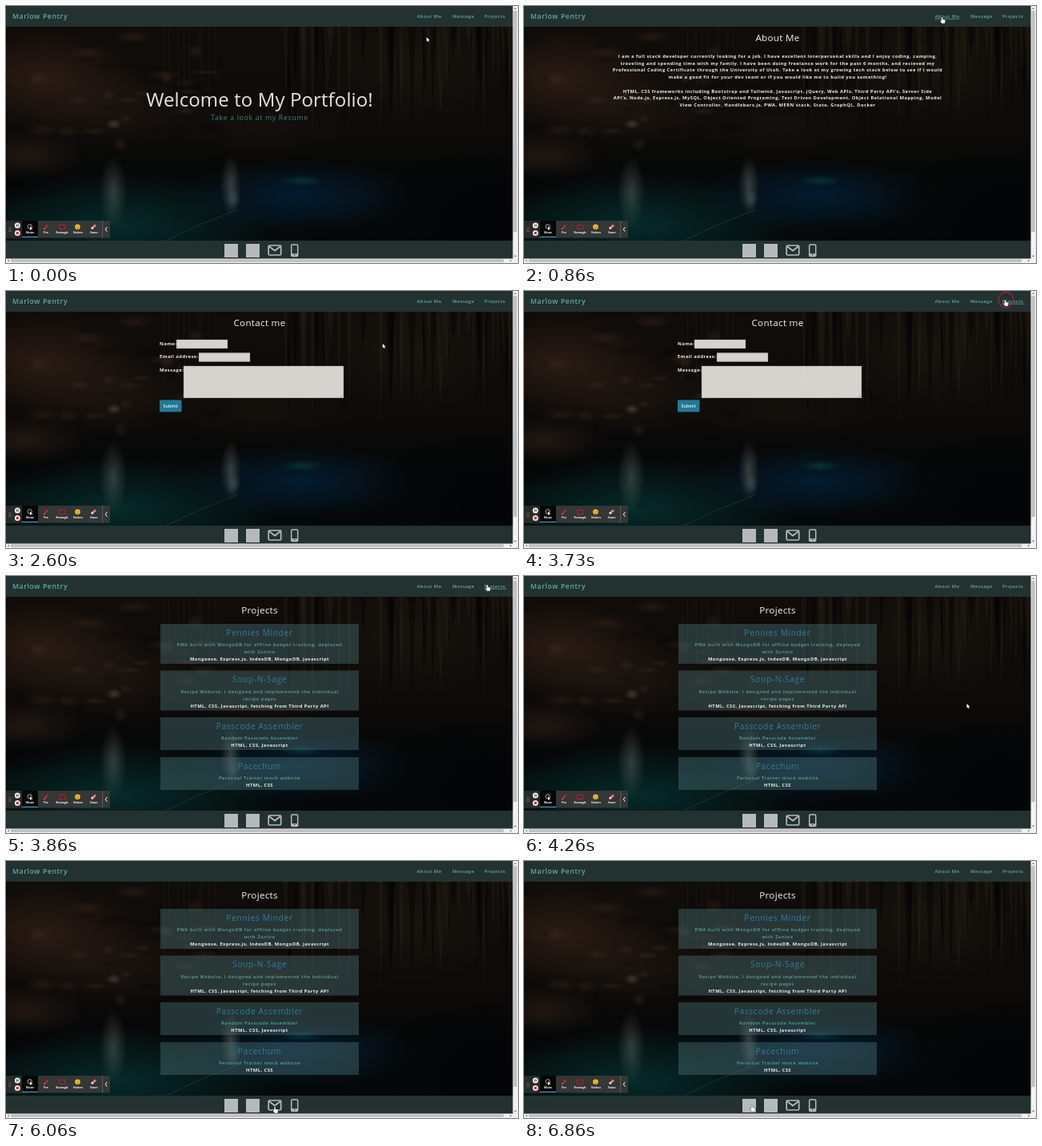
Write an HTML page with a canvas that moves like this. It is 640 by 322 pixels and loops after 7 s.

```html
<!DOCTYPE html>
<html lang="en">
<head>
<meta charset="utf-8">
<title>Portfolio walkthrough</title>
<style>
  html, body { margin: 0; width: 100%; height: 100%; overflow: hidden; background: #0b0d0d; }
  canvas { display: block; }
</style>
</head>
<body>
<canvas id="stage" width="640" height="322"></canvas>
<script>
const LOOP = 7000, CENTER = 317;
const stage = document.getElementById('stage');
let ctx = stage.getContext('2d');

// Screen updates come in bursts: [start, end, count]
const updates = [
  [0, 0, 1], [130, 660, 8], [860, 1260, 7], [1400, 1460, 2], [1600, 1800, 3],
  [2000, 2060, 2], [2200, 2860, 11], [3000, 3000, 1], [3730, 4260, 7], [4530, 4530, 1],
  [4930, 5000, 2], [5200, 5330, 2], [5530, 5600, 2], [6060, 6060, 1], [6260, 6460, 4],
  [6600, 6600, 1], [6860, 6860, 1]
].flatMap(([start, end, count]) =>
  Array.from({ length: count }, (_, i) => start + (end - start) * i / (count - 1 || 1)));

// Pointer hot spot: [time, x, y]
const route = [
  [0, 525.7, 39], [130, 526, 38], [660, 522.5, 14], [860, 522.5, 14], [1260, 484, 72],
  [1460, 492, 62], [1800, 548, 27], [2060, 562.5, 14], [2200, 562.5, 14], [2530, 440, 78],
  [2860, 594, 18], [3000, 601.5, 11], [3820, 601.5, 11], [4260, 553.5, 160],
  [4530, 520, 200], [5000, 440, 268], [5330, 376, 300], [5600, 361, 307],
  [6060, 336, 308], [6460, 312, 307], [6600, 309, 306], [6860, 285, 306], [LOOP, 285, 306]
];
const clicks = [660, 2060, 3730];

const styles = {
  brand:   { font: '600 8.7px', spacing: .6, color: '#62aaa6' },
  nav:     { font: '600 5.83px', spacing: .46, color: '#62aaa6' },
  hero:    { font: '500 24px', spacing: .1, color: '#e6e4e0' },
  resume:  { font: '400 8.74px', spacing: .68, color: '#3a7f8d' },
  heading: { font: '500 11.65px', spacing: .3, color: '#f4f4f2' },
  body:    { font: '700 5.83px', spacing: .45, color: '#eeeeec' },
  project: { font: '400 10.2px', spacing: .64, color: '#2f7d9b' },
  summary: { font: '600 5.83px', spacing: .55, color: '#5ba39f' },
  button:  { font: '600 5.2px', spacing: .1, color: '#f4f8fa' },
  tool:    { font: '700 3.1px', spacing: 0, color: '#ffffff' }
};

const links = [['About Me', 513.5, 31], ['Message', 558, 27], ['Projects', 598, 28]];
const icons = [273, 300, 327, 353];

const about = [
  'I am a full stack developer currently looking for a job. I have excellent interpersonal skills and I enjoy coding, camping,',
  'traveling and spending time with my family. I have been doing freelance work for the past 6 months, and recieved my',
  'Professional Coding Certificate through the University of Utah. Take a look at my growing tech stack below to see if I would',
  'make a good fit for your dev team or if you would like me to build you something!',
  '',
  "HTML, CSS frameworks including Bootstrap and Tailwind, Javascript, jQuery, Web APIs, Third Party API's, Server Side",
  "API's, Node.js, Express.js, MySQL, Object Oriented Programing, Test Driven Development, Object Relational Mapping, Model",
  'View Controller, Handlebars.js, PWA, MERN stack, State, GraphQL, Docker'
];

const projects = [
  [60, 50, 'Pennies Minder', ['PWA built with MongoDB for offline budget tracking, deployed', 'with Zunivo'],
    'Mongoose, Express.js, IndexDB, MongoDB, javascript'],
  [118.5, 50, 'Soup-N-Sage', ['Recipe Website, I designed and implemented the individual', 'recipe pages'],
    'HTML, CSS, Javascript, fetching from Third Party API'],
  [177, 41, 'Passcode Assembler', ['Random Passcode Assembler'], 'HTML, CSS, Javascript'],
  [227, 41, 'Pacechum', ['Personal Trainer mock website'], 'HTML, CSS']
];

function box(x, y, w, h, fill, radius = 0) {
  ctx.fillStyle = fill;
  ctx.beginPath();
  ctx.roundRect(x, y, w, h, radius);
  ctx.fill();
}

function frame(x, y, w, h, color, width = 1, radius = 0) {
  ctx.strokeStyle = color;
  ctx.lineWidth = width;
  ctx.beginPath();
  ctx.roundRect(x, y, w, h, radius);
  ctx.stroke();
}

function disc(x, y, r, fill) {
  ctx.fillStyle = fill;
  ctx.beginPath();
  ctx.arc(x, y, r, 0, 2 * Math.PI);
  ctx.fill();
}

function ring(x, y, r, color, width) {
  ctx.strokeStyle = color;
  ctx.lineWidth = width;
  ctx.beginPath();
  ctx.arc(x, y, r, 0, 2 * Math.PI);
  ctx.stroke();
}

function line(points, color, width = 1) {
  ctx.strokeStyle = color;
  ctx.lineWidth = width;
  ctx.beginPath();
  points.forEach(([x, y]) => ctx.lineTo(x, y));
  ctx.stroke();
}

function text(string, x, y, name, align = 'left') {
  const { font, spacing, color } = styles[name];
  ctx.font = `${font} "Open Sans", "Noto Sans", sans-serif`;
  ctx.letterSpacing = `${spacing}px`;
  ctx.fillStyle = color;
  ctx.textAlign = align;
  ctx.fillText(string, x, y);
}

const centered = (string, y, name) => text(string, CENTER, y, name, 'center');

function glow(x, y, rx, ry, rgb, alpha) {
  ctx.save();
  ctx.translate(x, y);
  ctx.scale(rx, ry);
  const shade = ctx.createRadialGradient(0, 0, 0, 0, 0, 1);
  shade.addColorStop(0, `rgba(${rgb},${alpha})`);
  shade.addColorStop(.5, `rgba(${rgb},${alpha * .5})`);
  shade.addColorStop(1, `rgba(${rgb},0)`);
  ctx.fillStyle = shade;
  ctx.fillRect(-1, -1, 2, 2);
  ctx.restore();
}

function paintCave() {
  let seed = 11;
  const random = () => (seed = seed * 16807 % 2147483647) / 2147483647;
  const base = ctx.createLinearGradient(0, 26, 0, 294);
  [[0, '#100c09'], [.5, '#0d0a08'], [.65, '#070808'], [1, '#050a0c']]
    .forEach(([stop, color]) => base.addColorStop(stop, color));
  box(0, 26, 634, 268, base);

  // rock walls and hanging formations
  glow(45, 90, 130, 60, '66,42,28', .55);
  glow(130, 130, 130, 50, '48,34,24', .4);
  glow(25, 188, 75, 30, '58,38,26', .5);
  glow(510, 75, 110, 80, '40,33,22', .4);
  glow(320, 150, 120, 45, '30,23,16', .4);
  for (let i = 0; i < 40; i++) {
    glow(random() * 260, 35 + random() * 150, 8 + random() * 18, 3 + random() * 7,
      i % 2 ? '80,54,38' : '2,2,2', .3);
  }
  for (let i = 0; i < 50; i++) {
    const x = 350 + random() * 280, width = 1 + random() * 4, tip = 55 + random() * 115;
    ctx.fillStyle = i % 2 ? 'rgba(60,50,32,.22)' : 'rgba(2,2,2,.4)';
    ctx.fill(new Path2D(`M${x - width} 26H${x + width}L${x + width / 2} ${tip * .7}L${x} ${tip}Z`));
  }
  for (let i = 0; i < 9; i++) {
    const x = 195 + i * 8 + random() * 6;
    line([[x, 26], [x + 1, 60 + random() * 70]], 'rgba(130,108,85,.16)', .6);
  }

  // pool and reflections
  glow(140, 275, 200, 65, '6,62,60', .62);
  glow(365, 238, 150, 46, '2,34,60', .75);
  glow(370, 219, 28, 7, '10,85,82', .45);
  glow(0, 225, 90, 25, '3,4,4', .6);
  glow(600, 265, 160, 90, '2,3,4', .9);
  glow(430, 295, 150, 34, '3,6,8', .7);
  glow(135, 148, 10, 7, '150,145,130', .3);
  glow(134, 233, 17, 46, '120,135,128', .36);
  glow(281, 225, 13, 38, '140,145,132', .36);
  glow(284, 242, 9, 14, '160,170,160', .2);
  line([[200, 294], [240, 275], [290, 255]], 'rgba(90,118,100,.35)', .8);
}

const cave = document.createElement('canvas');
cave.width = 640;
cave.height = 322;
ctx = cave.getContext('2d');
paintCave();
ctx = stage.getContext('2d');

const pages = {
  home() {
    centered('Welcome to My Portfolio!', 126, 'hero');
    centered('Take a look at my Resume', 142.5, 'resume');
  },
  about() {
    centered('About Me', 44, 'heading');
    about.forEach((row, i) => centered(row, 64.8 + i * 8.78, 'body'));
  },
  contact() {
    centered('Contact me', 44, 'heading');
    [['Name:', 67.5, 213, 61, 64, 11], ['Email address:', 84, 241, 77.5, 64, 11],
     ['Message:', 100.8, 222, 94, 200, 40]].forEach(([label, baseline, x, y, w, h]) => {
      text(label, 192, baseline, 'body');
      box(x, y, w, h, 'rgba(235,233,228,.9)');
      frame(x + .25, y + .25, w - .5, h - .5, '#a5a5a2', .5);
    });
    line([[418.5, 133], [421, 130.5]], '#777', .5);
    box(192, 136.5, 27.5, 15, '#23799a', 1.5);
    text('Submit', 205.8, 145.8, 'button', 'center');
  },
  projects() {
    centered('Projects', 46.5, 'heading');
    projects.forEach(([y, h, title, summary, tech]) => {
      box(193, y, 248, h, 'rgba(78,116,120,.42)');
      centered(title, y + 14.6, 'project');
      summary.forEach((row, i) => centered(row, y + 28.4 + i * 8.8, 'summary'));
      centered(tech, y + 28.4 + summary.length * 8.8, 'body');
    });
  }
};

function pageAt(time) {
  if (time < 860) return 'home';
  if (time < 2200) return 'about';
  return time <= 3730 ? 'contact' : 'projects';
}

function drawChrome(hovered) {
  box(0, 0, 634, 26, '#233130');
  box(0, 294, 634, 23, '#233130');
  text('Marlow Pentry', 8, 16, 'brand');
  links.forEach(link => {
    const [label, x, width] = link;
    text(label, x, 15, 'nav');
    if (link === hovered) box(x, 15.8, width, .7, styles.nav.color);
  });

  const silver = '#b4babb';
  box(icons[0], 298, 17, 17, silver);
  box(icons[1], 298, 17, 17, silver);
  frame(328.2, 300, 15.5, 12, silver, 1.7, 1.2);
  line([[328.7, 301], [336, 306.5], [343.2, 301]], silver, 1.8);
  frame(356.7, 299, 8, 14.5, silver, 1.5, 1.2);
  box(356.7, 310.2, 8, 3, silver);
  disc(360.7, 311.8, .8, '#233130');

  // scrollbars
  box(633.5, 0, 6.5, 322, '#f1f1f1');
  box(0, 316.4, 640, 5.6, '#f1f1f1');
  box(634.3, 6, 4.4, 277, '#c1c1c1');
  box(6, 317.2, 616, 3.8, '#c1c1c1');
  ctx.fillStyle = '#555';
  [[636.6, 3, 0], [636.6, 313.5, 2], [3, 319.2, 3], [631, 319.2, 1]].forEach(([x, y, turns]) => {
    ctx.save();
    ctx.translate(x, y);
    ctx.rotate(turns * Math.PI / 2);
    ctx.fill(new Path2D('M0 -1 1.4 .7H-1.4Z'));
    ctx.restore();
  });
}

function drawToolbar() {
  box(0, 269, 130, 21.5, '#353636');
  box(0, 269, 20, 21.5, '#292a2a');
  box(20, 269, 20, 21.5, '#060707');
  box(20, 288.8, 20, 1.2, '#4b93c8');
  box(120.5, 269, .6, 21.5, '#777');
  for (let i = 0; i < 6; i++) disc(4 + i % 2 * 2, 278 + (i >> 1) * 2.3, .5, '#aaa');

  disc(14.3, 275, 3.5, '#f3f3f3');
  box(13, 273.6, .9, 2.8, '#333');
  box(14.8, 273.6, .9, 2.8, '#333');
  disc(14.3, 284.5, 3.5, '#e9e5e5');
  box(12.8, 283, 3, 3, '#d4213b', .5);

  ring(29.7, 276.3, 2.7, '#d8c9cb', .8);
  ctx.fillStyle = '#fff';
  ctx.fill(new Path2D('M30 276V281L31.2 279.8 33.3 279.5Z'));
  line([[48, 279.2], [52.2, 274.5]], '#d51f35', 2);
  line([[47.4, 280], [48.4, 278.8]], '#eee', .8);
  frame(66.5, 274.3, 7.5, 5.2, '#b81c30', 1);
  disc(89.5, 276.8, 3.3, '#f6c431');
  disc(88.3, 276, .5, '#533a15');
  disc(90.7, 276, .5, '#533a15');
  line([[88, 278], [89.5, 278.8], [91, 278]], '#533a15', .6);
  line([[107, 279], [112, 274.5]], '#e58193', 2.6);
  line([[107, 279], [108.4, 277.7]], '#f0e6e8', 2.6);
  ['Mouse', 'Pen', 'Rectangle', 'Stickers', 'Eraser'].forEach((label, i) =>
    text(label, 30 + i * 20, 285.4, 'tool', 'center'));
  line([[126.3, 277], [124.3, 279.8], [126.3, 282.6]], '#fff', 1);
}

const arrow = new Path2D('M0 0V6.3L1.5 5 2.5 7.2 3.5 6.7 2.5 4.6H4.4Z');
const hand = new Path2D('M-.8 .4Q0 -.4 .8 .4V3.2L4 3.9Q4.9 4.2 4.7 5.2L4 8.8H-.4L-2.6 5.6Q-2.4 4.4 -.8 5.5Z');

function drawPointer(x, y, shape) {
  ctx.save();
  ctx.translate(x, y);
  ctx.scale(.87, .87);
  ctx.fillStyle = '#fff';
  ctx.strokeStyle = '#111';
  ctx.lineWidth = .9;
  ctx.stroke(shape);
  ctx.fill(shape);
  ctx.restore();
}

function pointerAt(time) {
  const next = route.findIndex(([t], i) => i && t >= time);
  const [t0, x0, y0] = route[next - 1], [t1, x1, y1] = route[next];
  const k = (time - t0) / (t1 - t0);
  return [x0 + (x1 - x0) * k, y0 + (y1 - y0) * k];
}

function render(now) {
  const elapsed = now % LOOP;
  const time = updates.findLast(t => t <= elapsed);
  const [x, y] = pointerAt(time);
  const link = y > 8 && y < 19 && links.find(([, left, width]) => x >= left && x <= left + width);
  const overIcon = y > 297 && icons.some(left => x >= left && x <= left + 17);

  ctx.drawImage(cave, 0, 0);
  pages[pageAt(time)]();
  drawChrome(link);
  drawToolbar();
  if (clicks.includes(time)) ring(x + 1, y, 9.5, '#a51c33', 1.3);
  drawPointer(x, y, link || overIcon ? hand : arrow);
}

const began = performance.now();
function tick() {
  render(performance.now() - began);
  requestAnimationFrame(tick);
}
tick();
</script>
</body>
</html>
```
